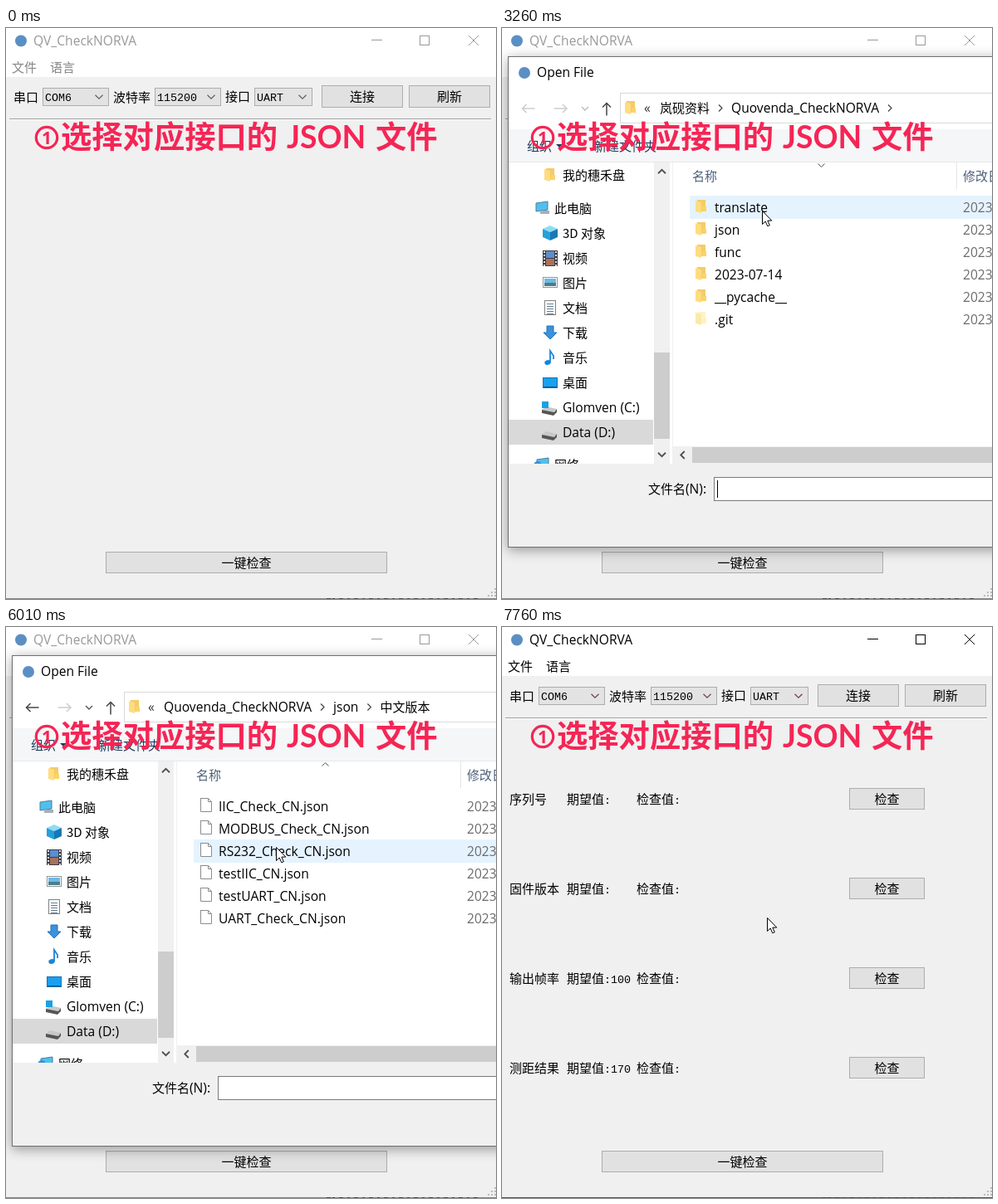
These frames come from a looping animation (590x688 px, 8000 ms). An HTML page with a canvas:

```html
<!DOCTYPE html>
<html lang="zh-CN">
<head>
<meta charset="utf-8">
<title>Open File</title>
<style>
html, body { margin: 0; width: 100%; height: 100%; overflow: hidden; background: #f0f0f0; }
canvas { display: block; }
</style>
</head>
<body>
<canvas id="stage" width="590" height="688"></canvas>
<script>
const LOOP = 8000, STEP = 67;
const stage = document.getElementById('stage').getContext('2d');
const layer = document.createElement('canvas');
layer.width = 640;
layer.height = 688;
const layerCtx = layer.getContext('2d');
let c = stage;

const UI = '15.6px "Open Sans", "Noto Sans", "Noto Sans CJK SC", sans-serif';
const CJK = '15px "Noto Sans CJK SC", "Noto Sans CJK", sans-serif';
const MONO = '13.33px "Liberation Mono", "Noto Sans CJK SC", monospace';
const BIG = 'bold 37.3px "Noto Sans CJK SC", "Noto Sans CJK", sans-serif';
const BIG_LATIN = 'bold 37.3px Lato, sans-serif';

const APP = 'QV_CheckNORVA', PROJECT = 'Quovenda_CheckNORVA', ROOT = '岚砚资料';
const FOLDERS = {
  project: { path: [ROOT, PROJECT, ''], items: ['translate', 'json', 'func', '2023-07-14', '__pycache__', '.git'] },
  json: { path: [ROOT, PROJECT, 'json', ''], items: ['英文版本', '中文版本'] },
  chinese: {
    path: [PROJECT, 'json', '中文版本'], files: true,
    items: ['IIC', 'MODBUS', 'RS232', 'testIIC', 'testUART', 'UART']
      .map(n => n + (n.startsWith('test') ? '_CN.json' : '_Check_CN.json'))
  }
};
const PLACES = ['我的穗禾盘', '此电脑', '3D 对象', '视频', '图片', '文档', '下载', '音乐', '桌面', 'Glomven (C:)', 'Data (D:)', '网络'];

// time, x, y of the pointer tip
const POINTER = [
  [270, 40, 19], [610, 22, 42], [1730, 22, 42], [1800, 26, 71], [2790, 26, 71],
  [3260, 313, 220], [3530, 317, 225], [3800, 317, 225], [4070, 325, 247],
  [5950, 325, 247], [6010, 325, 265], [6280, 321, 383], [6500, 319, 350], [LOOP, 319, 350]
];

const between = (t, a, b) => t >= a && t < b;

function stepped(t, a, b) {
  const n = Math.max(1, Math.round((b - a) / STEP));
  return Math.max(0, Math.min(1, Math.floor((t - a) / STEP + 0.01) / n));
}

function pointerAt(t) {
  const i = POINTER.findIndex((k, n) => n && t < k[0]);
  const [t0, x0, y0] = POINTER[i - 1], [t1, x1, y1] = POINTER[i];
  const p = stepped(t, t0, t1);
  return [x0 + (x1 - x0) * p, y0 + (y1 - y0) * p];
}

function rect(x, y, w, h, fill, stroke) {
  c.fillStyle = fill;
  c.fillRect(x, y, w, h);
  if (stroke) {
    c.strokeStyle = stroke;
    c.lineWidth = 1;
    c.strokeRect(x + 0.5, y + 0.5, w - 1, h - 1);
  }
}

function poly(points, stroke, width = 1, fill) {
  c.beginPath();
  points.forEach(([x, y]) => c.lineTo(x, y));
  if (fill) {
    c.closePath();
    c.fillStyle = fill;
    c.fill();
  }
  if (stroke) {
    c.strokeStyle = stroke;
    c.lineWidth = width;
    c.stroke();
  }
}

function text(s, x, y, font = UI, color = '#000', align = 'left') {
  c.font = font;
  c.fillStyle = color;
  c.textAlign = align;
  c.fillText(s, x, y);
}

function disc(x, y, r, color) {
  c.beginPath();
  c.arc(x, y, r, 0, Math.PI * 2);
  c.fillStyle = color;
  c.fill();
}

// chevron pointing along (dx, dy)
function chevron(x, y, dx, dy, size, color, width = 1.2) {
  const h = size / 2;
  poly([[x - dx * h - dy * size, y - dy * h - dx * size], [x + dx * h, y + dy * h],
    [x - dx * h + dy * size, y - dy * h + dx * size]], color, width);
}

function arrow(x, y, dx, dy, color) {
  poly([[x - dx * 7.5, y - dy * 7.5], [x + dx * 7.5, y + dy * 7.5]], color, 1.5);
  chevron(x + dx * 5, y + dy * 5, dx, dy, 5, color, 1.5);
}

function button(label, x, y, w, h = 27) {
  rect(x, y, w, h, '#e1e1e1', '#adadad');
  text(label, x + w / 2, y + h / 2 + 5.5, CJK, '#000', 'center');
}

function combo(label, x, w, chevronColor) {
  rect(x, 72, w, 22, '#e3e3e3', '#adadad');
  text(label, x + 3, 88, MONO);
  chevron(x + w - 12, 83, 0, 1, 4.5, chevronColor);
}

function drawWindow(t) {
  const active = between(t, 940, 2460) || t >= 7560;
  const menuDark = between(t, 940, 7490) || active;
  const ink = active ? '#000' : '#999';
  const menuInk = menuDark ? '#000' : '#858585';
  const arrowInk = menuDark ? '#70404a' : '#606060';
  rect(0, 0, 590, 688, '#f0f0f0');
  rect(0, 0, 590, 59, '#fff');
  disc(18, 15.5, 7, '#5b8fc4');
  text(APP, 33, 21, UI, ink);
  poly([[440, 14.5], [453, 14.5]], ink);
  c.strokeRect(498.5, 9.5, 11, 11);
  poly([[557, 9], [569, 21]], ink);
  poly([[569, 9], [557, 21]], ink);

  if (between(t, 480, 940)) rect(0, 35, 45, 24, '#e5f3ff', '#cce8ff');
  if (between(t, 940, 2860)) rect(0, 35, 45, 24, '#cce8ff', '#99d1ff');
  text('文件', 7, 53, CJK, menuInk);
  text('语言', 53, 53, CJK, menuInk);

  text('串口', 9, 88.5, CJK);
  text('波特率', 129, 88.5, CJK);
  text('接口', 264, 88, CJK);
  combo('COM6', 44, 80, arrowInk);
  combo('115200', 179, 80, arrowInk);
  combo('UART', 299, 70, arrowInk);
  button('连接', 380, 69, 98);
  button('刷新', 485, 69, 98);
  rect(4, 109, 580, 1, '#a0a0a0');
  rect(4, 110, 580, 1, '#fff');

  if (t >= 7690) ['序列号', '固件版本', '输出帧率', '测距结果'].forEach((name, i) => {
    const y = 212.5 + i * 108;
    text(name, 9, y, CJK);
    text('期望值', 78, y, CJK);
    text(':' + ['', '', '100', '170'][i], 123, y, MONO);
    text('检查值', 162, y, CJK);
    text(':', 207, y, MONO);
    button('检查', 418, y - 18.5, 91, 26);
  });
  button('一键检查', 120, 631, 339, 26);

  for (let i = 0; i < 3; i++)
    for (let j = 0; j <= i; j++) rect(588 - j * 4, 675 + i * 4, 2, 2, '#bcb8b8');
  rect(0, 687, 590, 1, active ? '#555' : '#858585');
  for (let x = 386; x < 572; x += 5 + (x * 7) % 6) rect(x, 687, 3 + x % 3, 1, '#444');
}

function drawMenu(t) {
  if (!between(t, 1000, 2460)) return;
  c.globalAlpha = 0.35 + 0.65 * stepped(t, 1000, 1140);
  rect(0, 59, 159, 34, '#f2f2f2', '#ccc');
  if (t >= 1730) rect(2, 62, 154, 28, '#90c8f6');
  text('打开JSON文件', 33, 81, CJK);
  c.globalAlpha = 1;
}

function folder(x, y, pale) {
  rect(x + 2, y, 10, 14, pale ? '#fdf3c8' : '#f3cc68');
  poly([[x, y + 1], [x + 7, y + 3], [x + 7, y + 16], [x, y + 14]], null, 1, pale ? '#fbe9a8' : '#ffdc80');
  rect(x + 8, y + 8, 5, 6, pale ? '#fff1bd' : '#fbd367');
}

function page(x, y) {
  poly([[x + 0.5, y + 0.5], [x + 9.5, y + 0.5], [x + 13.5, y + 4.5], [x + 13.5, y + 16.5], [x + 0.5, y + 16.5], [x + 0.5, y]], '#8c8c8c', 1, '#fff');
  poly([[x + 9.5, y + 0.5], [x + 9.5, y + 4.5], [x + 13.5, y + 4.5]], '#8c8c8c');
}

function disk(x, y) {
  poly([[x, y], [x + 5, y - 4], [x + 18, y - 1], [x + 15, y + 3]], null, 1, '#c9c9c9');
  poly([[x, y], [x + 15, y + 3], [x + 18, y - 1], [x + 18, y + 3], [x + 14, y + 7], [x, y + 4]], null, 1, '#555');
}

function monitor(x, y) {
  poly([[x, y - 6], [x + 14, y - 8], [x + 14, y + 2], [x, y + 4]], '#4d7f9f', 1, '#4fc0ee');
  rect(x + 5, y + 3, 11, 4, '#a5b0b8');
}

const placeIcons = [
  y => folder(51, y - 8),
  y => monitor(41, y),
  y => {
    poly([[58, y - 9], [67, y - 5], [58, y - 1], [49, y - 5]], null, 1, '#8edcf5');
    poly([[49, y - 5], [58, y - 1], [58, y + 9], [49, y + 5]], null, 1, '#25a0d8');
    poly([[67, y - 5], [58, y - 1], [58, y + 9], [67, y + 5]], null, 1, '#1679b5');
  },
  y => {
    rect(49, y - 9, 18, 19, '#3c3c46');
    rect(53, y - 8, 10, 8, '#5a8ed0');
    rect(53, y + 1, 10, 8, '#a8715c');
    for (let i = 0; i < 5; i++) [50, 64].forEach(x => rect(x, y - 8 + i * 4, 2, 2, '#ddd'));
  },
  y => {
    rect(49, y - 7, 18, 13, '#fff', '#8a949c');
    rect(51, y - 5, 14, 5, '#6db9e8');
    rect(51, y, 14, 4, '#4b7d86');
  },
  y => {
    rect(51, y - 9, 14, 18, '#fff', '#808080');
    for (let i = 0; i < 5; i++) rect(54, y - 5 + i * 3, 8, 1, '#607d92');
  },
  y => poly([[54, y - 8], [62, y - 8], [62, y], [66, y], [58, y + 8], [50, y], [54, y]], '#2272b8', 1, '#3b91dc'),
  y => {
    c.beginPath();
    c.ellipse(55, y + 6, 3.8, 2.8, -0.3, 0, 7);
    c.fillStyle = '#1a87d8';
    c.fill();
    poly([[58, y + 6], [58, y - 8], [62, y - 2], [62, y + 2]], '#1a87d8', 1.8);
  },
  y => {
    rect(49, y - 6, 18, 13, '#19a0f0', '#1670b0');
    rect(50, y + 5, 16, 1, '#0b5a94');
  },
  y => { disk(48, y + 3); rect(48, y - 7, 8, 8, '#1ba1e2'); },
  y => disk(48, y + 3),
  y => { monitor(42, y); disc(43, y + 1, 5, '#3d8fd0'); }
];

function drawSidebar() {
  c.save();
  c.beginPath();
  c.rect(8, 162, 175, 363);
  c.clip();
  rect(8, 472, 174, 30, '#d9d9d9');
  PLACES.forEach((name, i) => {
    const y = i ? 187 + i * 30 + (i === 11 ? 9 : 0) : 177;
    placeIcons[i](y);
    text(name, i === 1 || i === 11 ? 63 : 73, y + 5.5, /[A-Z][a-z]/.test(name) ? UI : CJK);
  });
  c.restore();
}

function drawPath(path) {
  folder(148, 88);
  text('«', 171, 102, UI, '#333');
  let x = 190;
  path.forEach((part, i) => {
    if (i) {
      chevron(x + 13, 96.5, 1, 0, 4, '#444');
      x += 26;
    }
    const font = /[a-z]/.test(part) ? UI : CJK;
    text(part, x, 102, font);
    x += c.measureText(part).width;
  });
}

function drawList(folderView, selected, hover) {
  folderView.items.forEach((name, i) => {
    const y = 202 + i * 27;
    if (i === selected) rect(226, y, 420, 28, '#cce8ff', '#99d1ff');
    else if (i === hover) rect(226, y, 420, 28, '#e5f3ff');
    if (folderView.files) page(234, y + 4);
    else folder(233, y + 5, name === '.git');
    text(name, 256, y + 20, /[a-z0-9]/.test(name) ? UI : CJK);
    text('2023/7/14', 555, y + 20, UI, '#6d6d6d');
  });
}

function drawDialog(t) {
  const [px, py] = pointerAt(t);
  const view = t < 4400 ? FOLDERS.project : t < 5610 ? FOLDERS.json : FOLDERS.chinese;
  const loaded = t >= 2990;
  const chosen = t >= 7230;
  const selected = chosen ? 5 : between(t, 4140, 4400) || between(t, 5340, 5610) ? 1 : -1;
  const hover = px > 226 ? Math.floor((py - 202) / 27) : -1;
  const canGoBack = t >= 4400;

  c.clearRect(0, 0, 640, 688);
  c.shadowColor = 'rgba(0,0,0,.38)';
  c.shadowBlur = 14;
  c.shadowOffsetY = 3;
  rect(7, 34, 660, 592, '#6f6f6f');
  c.shadowColor = 'transparent';
  rect(8, 35, 640, 590, '#fff');
  disc(27, 54, 7, '#5b8fc4');
  text('Open File', 42, 59);

  rect(8, 122, 640, 40, '#f5f6f7');
  rect(8, 161, 640, 1, '#e6e8ea');
  rect(8, 525, 640, 100, '#f0f0f0');
  rect(183, 162, 19, 363, '#f0f0f0');
  rect(183, 391, 19, 104, '#cdcdcd');
  chevron(192.5, 173, 0, -1, 4.5, '#505050', 1.8);
  chevron(192.5, 514, 0, 1, 4.5, '#505050', 1.8);
  rect(205, 162, 1, 363, '#f0f0f0');
  rect(206, 504, 434, 21, '#f0f0f0');
  rect(229, 505, 411, 19, '#cdcdcd');
  rect(255, 541, 400, 29, '#fff', loaded && '#7a7a7a');
  if (!loaded) return;

  chevron(217.5, 514.5, -1, 0, 4.5, '#505050', 1.8);
  arrow(32, 97, -1, 0, canGoBack ? '#444' : '#ccc');
  arrow(70.5, 97, 1, 0, '#ccc');
  chevron(100, 97, 0, 1, 4, canGoBack ? '#555' : '#bbb', 1.4);
  arrow(126, 98, 0, -1, '#444');
  rect(142, 78, 500, 37, '#fff', '#d9d9d9');
  drawPath(view.path);
  text('组织', 30, 147.5, CJK, '#1e395b');
  poly([[65, 140], [73, 140], [69, 144]], null, 1, '#1e395b');
  text('新建文件夹', 111, 147.5, CJK, '#1e395b');
  drawSidebar();

  text('名称', 229, 183.5, CJK, '#4c607a');
  text('修改日期', 555, 183.5, CJK, '#4c607a');
  chevron(384.5, 165.5, 0, canGoBack ? -1 : 1, 4, '#555', 1);
  rect(547, 162, 1, 32, '#e5e5e5');
  drawList(view, selected, hover);

  text('文件名', 176, 561, CJK);
  text('(N):', 221, 561);
  if (t < 4270) rect(259, 545, 1, 21, '#000');
  if (chosen) text(FOLDERS.chinese.items[5], 259, 561);
}

function showDialog(t) {
  if (!between(t, 2790, 7690)) return;
  const shown = t < 7490 ? 0.1 + 0.9 * stepped(t, 2790, 2990) : 0.7 - 0.6 * stepped(t, 7490, 7690);
  const scale = 0.955 + 0.045 * shown;
  c = layerCtx;
  drawDialog(t);
  c = stage;
  c.save();
  c.globalAlpha = shown;
  c.translate(471, 330);
  c.scale(scale, scale);
  c.drawImage(layer, -471, -330);
  c.restore();
}

function drawCaption() {
  const pink = '#f52555';
  c.beginPath();
  c.arc(49, 132, 12.7, 0, Math.PI * 2);
  c.strokeStyle = pink;
  c.lineWidth = 3.2;
  c.stroke();
  text('1', 49, 139.5, 'bold 21px "Open Sans", sans-serif', pink, 'center');
  text('选择对应接口的', 66, 145, BIG, pink);
  text('JSON', 338, 145, BIG_LATIN, pink);
  text('文件', 445, 145, BIG, pink);
}

function drawPointer(t) {
  if (t < 270) return;
  const [x, y] = pointerAt(t);
  const shape = [[0, 0], [0, 16], [3.7, 12.5], [6.3, 18.3], [8.8, 17.2], [6.3, 11.6], [11.3, 11.6], [0, 0]];
  poly(shape.map(([dx, dy]) => [x + 0.5 + dx, y + 0.5 + dy]), '#000', 1, '#fff');
}

function render(t) {
  drawWindow(t);
  drawMenu(t);
  showDialog(t);
  drawCaption();
  drawPointer(t);
}

const start = performance.now();
function tick() {
  render((performance.now() - start) % LOOP);
  requestAnimationFrame(tick);
}
tick();
</script>
</body>
</html>
```
